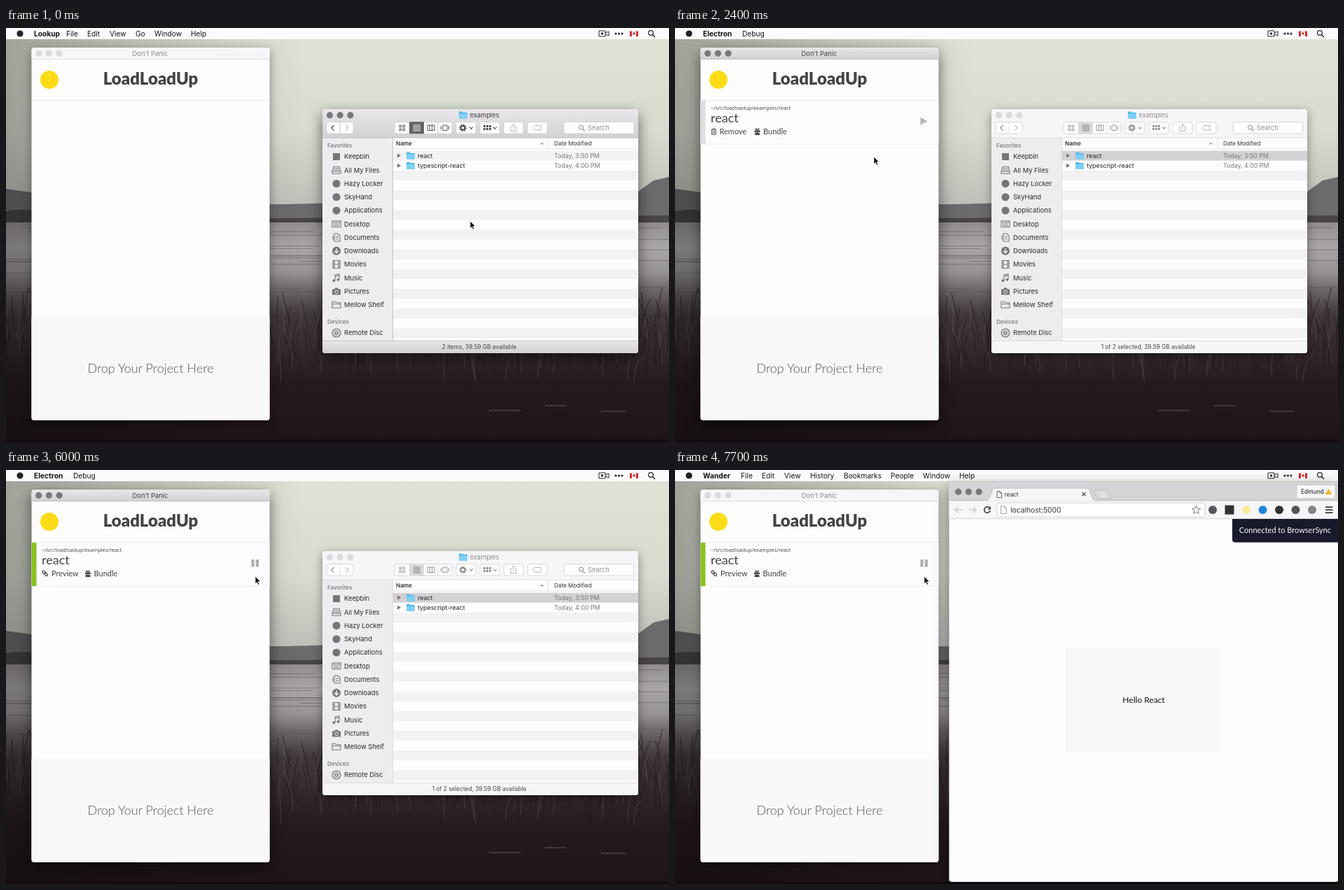
An HTML page for the animation above (8100 ms loop, 947 px wide and 592 px high).

```html
<!DOCTYPE html>
<html lang="en">
<head>
<meta charset="utf-8">
<title>Project bundler demo</title>
<style>
html, body { margin: 0; width: 100%; height: 100%; overflow: hidden; background: #1f151b }
svg { display: block; width: 947px; height: 592px; font-family: Inter, Roboto, sans-serif }
text { white-space: pre }
.lato { font-family: Lato, "Open Sans", sans-serif }
.mid { text-anchor: middle }
.win { --bar: #f6f5f7; --dot: #dcdadd; --ink: #8d8b8e; --line: #d8d6d9; --tabs: #efedf0 }
.win.on { --bar: url(#bar); --dot: #7a787b; --ink: #414042; --line: #b9b7ba; --tabs: #d5d3d6 }
.bar { fill: var(--bar) }
.dot { fill: var(--dot) }
.ink { fill: var(--ink) }
.edge { stroke: var(--line); fill: none }
.btn { fill: #fdfcfe; stroke: #d2d0d3; stroke-width: .8 }
.glyph { fill: none; stroke: var(--ink); stroke-width: 1.1 }
.side { fill: none; stroke: #777579; stroke-width: 1.1 }
.solid { fill: #777579 }
.shadow { filter: drop-shadow(0 4px 7px rgba(0,0,0,.4)) }
.on .shadow { filter: drop-shadow(0 7px 10px rgba(0,0,0,.55)) }
.pick { fill: #f3f2f4 }
.picked .pick { fill: #d3d1d4 }
.picked.on .pick { fill: #636165 }
.picked.on .pickText { fill: #fff }
.picked .tool { stroke: #555 }
.picked:not(.on) .tool { stroke: #b4b2b5 }
.hide { display: none }
</style>
</head>
<body>
<svg id="stage" viewBox="0 0 947 592">
  <defs>
    <linearGradient id="bar" x2="0" y2="1"><stop stop-color="#e9e7ea"/><stop offset="1" stop-color="#d2d0d3"/></linearGradient>
    <linearGradient id="sky" x2="0" y2="1"><stop stop-color="#dfe3d5"/><stop offset=".5" stop-color="#d8dbcf"/><stop offset="1" stop-color="#b8b8b2"/></linearGradient>
    <linearGradient id="lake" x2="0" y2="1"><stop stop-color="#918c90"/><stop offset=".25" stop-color="#aaa6a8"/><stop offset="1" stop-color="#716b70"/></linearGradient>
    <linearGradient id="bank" x2="0" y2="1"><stop stop-color="#4a4247" stop-opacity="0"/><stop offset=".25" stop-color="#41383e"/><stop offset=".65" stop-color="#261a21"/><stop offset="1" stop-color="#1f141a"/></linearGradient>
    <linearGradient id="dim"><stop stop-opacity=".28"/><stop offset=".45" stop-opacity="0"/></linearGradient>
    <g id="folder"><path d="M0 1q0-1 1-1h3.5l1 1.3H11q1 0 1 1V9q0 1-1 1H1Q0 10 0 9Z" fill="#53b9ea"/><path d="M0 3h12v6q0 1-1 1H1Q0 10 0 9Z" fill="#7fd0f5"/></g>
  </defs>

  <g id="desk"></g>
  <g id="menu"></g>
  <g id="app" class="win"></g>
  <g id="files" class="win"></g>
  <g id="web" class="win"></g>

  <g id="pointer">
    <g id="drag" opacity=".8">
      <use href="#folder" x="-29" y="-2"/>
      <rect x="-16" y="-3" width="27" height="12" rx="6" fill="#8a888b"/>
      <text x="-13" y="6.2" font-size="8.9" fill="#fff">react</text>
    </g>
    <path d="M0 0V10.5L2.4 8.4L4.2 12.2L6 11.4L4.2 7.7H7.4Z" fill="#111" stroke="#fff" stroke-width=".7"/>
  </g>
</svg>
<script>
const $ = id => document.getElementById(id);
const text = (x, y, size, str, attrs = '') => `<text x="${x}" y="${y}" font-size="${size}" ${attrs}>${str}</text>`;
const rect = (x, y, w, h, attrs = '') => `<rect x="${x}" y="${y}" width="${w}" height="${h}" ${attrs}/>`;
const path = (d, attrs = '') => `<path d="${d}" ${attrs}/>`;
const circle = (x, y, r, attrs = '') => `<circle cx="${x}" cy="${y}" r="${r}" ${attrs}/>`;
const at = (x, y, body) => `<g transform="translate(${x} ${y})">${body}</g>`;
const lights = (x, y) => [0, 14.7, 29.4].map(d => circle(x + d, y, 4.6, 'class="dot"')).join('');
const topBar = (x, y, w, h) => path(`M${x} ${y + h}v${4 - h}q0-4 4-4h${w - 8}q4 0 4 4v${h - 4}Z`, 'class="bar"');

function seeded(seed) {
  return () => (seed = seed * 16807 % 2147483647) / 2147483647;
}

function drawDesk() {
  const rand = seeded(42);
  let streaks = '', dark = '', light = '';
  for (let i = 0; i < 45; i++)
    streaks += `M${rand() * 947 - 60} ${284 + rand() * 95}h${40 + rand() * 150}`;
  for (let i = 0; i < 420; i++) {
    const blade = `M${rand() * 947} ${420 + rand() * 90}q${rand() * 8 - 4}-25 ${rand() * 30 - 15}-${32 + rand() * 30}`;
    if (i % 4) dark += blade; else light += blade;
  }
  $('desk').innerHTML =
    rect(0, 16, 947, 265, 'fill="url(#sky)"') +
    path('M0 230Q60 238 140 252H400Q520 248 640 252T903 234L925 218L947 213V280H0Z', 'fill="#6d6a6d"') +
    path('M0 262Q30 256 60 266L380 272L947 268V280H0Z', 'fill="#484448"') +
    rect(0, 278, 947, 140, 'fill="url(#lake)"') +
    path(streaks, 'stroke="#5d575c" stroke-opacity=".55" fill="none"') +
    rect(0, 350, 947, 242, 'fill="url(#bank)"') +
    path(dark, 'stroke="#251b21" stroke-opacity=".8" fill="none"') +
    path(light, 'stroke="#74696f" stroke-opacity=".4" fill="none"') +
    path('M690 547h45M770 540h30M850 548h35', 'stroke="#62565d" stroke-opacity=".5" stroke-width="2"') +
    rect(0, 16, 947, 576, 'fill="url(#dim)"') +
    rect(0, 589, 947, 3, 'fill="#120c10"');
}

function drawMenu() {
  const menus = {
    lookup: [[40, 'Lookup'], [86, 'File'], [116, 'Edit'], [148, 'View'], [185, 'Go'], [212, 'Window'], [264, 'Help']],
    electron: [[40, 'Electron'], [96, 'Debug']],
    browser: [[40, 'Wander'], [94, 'File'], [124, 'Edit'], [156, 'View'], [193, 'History'], [241, 'Bookmarks'],
      [308, 'People'], [354, 'Window'], [406, 'Help']]
  };
  let out = rect(0, 0, 947, 16, 'fill="#fbfafc"') + circle(20, 8, 4.6, 'fill="#222"');
  for (const name in menus)
    out += `<g id="menu-${name}">` + menus[name].map(([x, label], i) =>
      text(x, 11.8, 10.2, label, `fill="#151515" font-weight="${i ? 400 : 700}"`)).join('') + '</g>';
  $('menu').innerHTML = out +
    path('M847 4h9v8h-9ZM856 7l5-2v6l-5-2', 'fill="none" stroke="#222"') + circle(851.5, 8, 1.7, 'fill="#222"') +
    [871, 875.5, 880].map(x => circle(x, 8, 1.5, 'fill="#222"')).join('') +
    rect(891, 4.5, 12, 7.5, 'fill="#d92a32"') + rect(894, 4.5, 6, 7.5, 'fill="#fff"') +
    path('M897 5.5l2 2.5-2 2-2-2Z', 'fill="#d92a32"') +
    circle(921, 7, 3.4, 'fill="none" stroke="#222" stroke-width="1.2"') + path('M923.5 9.5l3.5 3.5', 'stroke="#222" stroke-width="1.5"');
}

const gift = (x, y) => at(x, y, path('M-4-1.5H4V1H-4ZM-3.4 2h2.8v3h-2.8ZM.6 2h2.8v3H.6ZM-.6-1.5H.6V5H-.6Z', 'fill="#444"') +
  path('M0-2Q-3-2-2.5-4T0-2Q1-5 2.5-4T0-2', 'fill="none" stroke="#444"'));

function drawApp() {
  const label = (x, str) => text(x, 151.8, 11, str, 'class="lato" fill="#444"');
  $('app').innerHTML =
    rect(36.5, 28, 340, 533, 'rx="4" fill="#fdfcfe" class="shadow"') +
    topBar(36.5, 28, 340, 16.5) + path('M36.5 44.5h340', 'class="edge" stroke-width=".8"') + lights(46.7, 36.3) +
    text(206, 39.8, 9.4, "Don't Panic", 'class="mid ink"') +
    circle(62, 74, 13, 'fill="#fbdc17"') +
    text(206.5, 81.3, 24, 'LoadLoadUp', 'class="mid lato" font-weight="900" fill="#454346"') +
    path('M36.5 103.5h340', 'stroke="#ebe9ec"') +
    path('M36.5 413h340v144q0 4-4 4h-332q-4 0-4-4Z', 'fill="#f8f7f9"') +
    text(206.5, 493.2, 18, 'Drop Your Project Here', 'class="mid lato" font-weight="300" fill="#555"') +
    `<g id="project">` +
      rect(36.5, 104, 340, 62, 'fill="#fcfbfd"') + path('M36.5 166h340', 'stroke="#f0eef1"') +
      rect(36.5, 104, 7, 62, 'id="strip"') +
      text(51, 117, 7.4, '~/src/loadloadup/examples/react', 'style="font-family:Open Sans,sans-serif" fill="#444"') +
      text(51, 135.2, 18, 'react', 'class="lato" fill="#444"') +
      `<g id="idle">` + path('M350.5 127.8v11l10-5.5Z', 'fill="#b9b7ba"') +
        path('M51.5 145.5h7.5M54 145v-1.2h2.8v1.2M52.3 146v6.2h6v-6.2M54.3 147v4M56.3 147v4', 'fill="none" stroke="#444" stroke-width=".9"') +
        label(63.5, 'Remove') + gift(117.5, 148) + label(126, 'Bundle') + '</g>' +
      `<text id="progress" class="lato" x="51" y="151.8" font-size="11" fill="#444"></text>` +
      `<g id="ready">` + rect(350.5, 128, 4.2, 10.5, 'fill="#b0aeb1"') + rect(356.8, 128, 4.2, 10.5, 'fill="#b0aeb1"') +
        at(56, 148, `<g transform="rotate(45)" fill="none" stroke="#444" stroke-width="1.2">` +
          rect(-5, -1.6, 5, 3.2, 'rx="1.6"') + rect(-.8, -1.6, 5, 3.2, 'rx="1.6"') + '</g>') +
        label(65, 'Preview') + gift(117, 148) + label(125.5, 'Bundle') + '</g>' +
    '</g>';
}

function drawFiles() {
  const line = d => path(d, 'class="side"');
  const mark = circle(0, 0, 5.6, 'class="solid"');
  const page = line('M-3-5.5H2L5-2.5V5.5H-3ZM-5-3V3.5M-1-1H3M-1 2H3');
  const folder = line('M-6-4.5h4l1.3 1.5H6v7.5H-6ZM-6-1H6');
  const items = [
    ['Keepbin', rect(-5, -5, 10, 10, 'class="solid"')],
    ['All My Files', line('M-4-5H4L6 2V5H-6V2ZM-6 2H6M-3.5-2.5h7M-4 0h8')],
    ['Hazy Locker', mark], ['SkyHand', mark], ['Applications', mark],
    ['Desktop', line('M-6-4.5H6V4.5H-6ZM-6-2.5H6M-4 2.5H4M-4 0H4')],
    ['Documents', page],
    ['Downloads', circle(0, 0, 6, 'class="solid"') + path('M0-3.5V2.5M-3 0L0 3L3 0', 'fill="none" stroke="#eee" stroke-width="1.6"')],
    ['Movies', line('M-5-5.5H5V5.5H-5ZM-3-5.5v11M3-5.5v11M-3 0H3M-5-2h2M-5 2h2M3-2h2M3 2h2')],
    ['Music', line('M-2 4V-4L4-5.5V2.5M-2-2L4-3.5') + circle(-3.7, 4, 1.9, 'class="solid"') + circle(2.3, 2.6, 1.9, 'class="solid"')],
    ['Pictures', path('M-6-3h3l1.3-2h3.4L3-3h3v8H-6Z', 'class="solid"') + circle(0, .8, 2.3, 'fill="none" stroke="#eee"')],
    ['Mellow Shelf', folder]
  ];
  const entry = (icon, label, y) => at(472, y, icon) + text(483, y + 3.4, 9.4, label, 'fill="#2b2a2c"');
  const head = (y, label) => text(459, y, 8.1, label, 'font-weight="500" fill="#767477"');
  const button = (x, w) => rect(x, 134.5, w, 16.5, 'rx="2.5" class="btn"');
  const row = (y, name, date, cls) => path(`M559 ${y - 3}v6l5.2-3Z`, `fill="#777" class="${cls}"`) +
    `<use href="#folder" x="572" y="${y - 5}"/>` + text(588, y + 3.2, 8.9, name, `fill="#222" class="${cls}"`) +
    text(783, y + 3.2, 8.8, date, `fill="#777" class="${cls}"`);
  let stripes = '';
  for (let i = 2; i < 20; i += 2) stripes += rect(552.5, 175.6 + 14.1 * i, 350, 14.1, 'fill="#f2f1f3"');
  const chevron = x => path(`M${x} 141.5l2.4 2.6 2.4-2.6`, 'class="glyph"');
  const dots = [0, 4, 8].flatMap(x => [0, 4].map(y => rect(682 + x, 139 + y, 2.8, 2.8, 'class="ink"'))).join('');

  $('files').innerHTML =
    rect(452, 116, 451, 349, 'rx="4" fill="#fdfcfe" class="shadow"') +
    topBar(452, 116, 451, 41) + lights(462.5, 124.7) +
    `<use href="#folder" x="647" y="119.5"/>` + text(662.5, 128.3, 9.3, 'examples', 'class="ink"') +
    button(458, 38) + path('M477 134.5v16.5', 'class="edge" stroke-width=".7"') +
    path('M468.5 139l-3.8 3.8 3.8 3.8', 'class="glyph"') + path('M485.5 139l3.8 3.8-3.8 3.8', 'fill="none" stroke="#bbb" stroke-width="1.1"') +
    button(555, 82) + path('M617 134.5v16.5', 'class="edge" stroke-width=".7"') +
    rect(576, 134.2, 21, 17, 'class="dot" id="listMode"') +
    [562, 567].map(x => [139, 144].map(y => rect(x, y, 2.7, 2.7, 'class="glyph" style="stroke-width:.8"')).join('')).join('') +
    path('M581.5 139h10.5M581.5 141.6h10.5M581.5 144.2h10.5M581.5 146.8h10.5', 'id="listLines"') +
    path('M602 139h10v7.5h-10ZM605.3 139v7.5M608.6 139v7.5M624 139h6v7.5h-6ZM621.5 140v5.5M632.5 140v5.5', 'class="glyph" style="stroke-width:.9"') +
    button(643, 28) + circle(652.5, 142.8, 3, 'class="glyph" style="stroke-width:2"') +
    circle(652.5, 142.8, 4.8, 'class="glyph" stroke-dasharray="1.8 1.97"') + chevron(662) +
    button(677, 28) + dots + chevron(696) +
    button(711, 28) + path('M722.5 141h-1.7v6.5h8v-6.5h-1.7M725 145v-8M723 139l2-2 2 2', 'class="tool" fill="none" stroke="#bbb"') +
    button(745, 28) + path('M755.5 139.5h8.5v6.6h-8.5l-3-3.3Z', 'class="tool" fill="none" stroke="#bbb"') +
    rect(797, 134.5, 100, 16.5, 'rx="2.5" class="btn"') +
    circle(821.5, 142, 3, 'fill="none" stroke="#888"') + path('M823.7 144.3l3 3', 'stroke="#888" stroke-width="1.2"') +
    text(831, 146.3, 9.3, 'Search', 'fill="#929094"') +
    rect(452, 157, 100.5, 290, 'fill="#eeecef"') +
    head(171, 'Favorites') + items.map(([label, icon], i) => entry(icon, label, 184 + 19.25 * i)).join('') +
    head(422.7, 'Devices') + entry(circle(0, 0, 6, 'class="side" style="fill:#d1cfd2"') + circle(0, 0, 2, 'class="side"'), 'Remote Disc', 436) +
    stripes + rect(552.5, 175.6, 350.5, 14, 'class="pick"') +
    path('M452 157h451M552.5 157v290', 'class="edge" stroke-width=".8"') +
    path('M552.5 173h350.5M774.5 158v14', 'stroke="#dddbde" stroke-width=".8"') +
    text(557, 168, 8.1, 'Name', 'font-weight="600" fill="#333"') + path('M763 166.5l2.4-2.4 2.4 2.4', 'fill="none" stroke="#555"') +
    text(783, 168, 8.1, 'Date Modified', 'fill="#333"') +
    row(182.6, 'react', 'Today, 3:50 PM', 'pickText') + row(196.8, 'typescript-react', 'Today, 4:00 PM', '') +
    path('M452 447.5h451v13.5q0 4-4 4h-443q-4 0-4-4Z', 'class="bar"') + path('M452 447.5h451', 'class="edge" stroke-width=".8"') +
    `<text id="count" class="mid" x="676" y="458.8" font-size="8.3" fill="#444"></text>`;
}

function drawWeb() {
  const ext = (x, color, id = '') => circle(x, 57, 6, `fill="${color}" ${id}`);
  $('web').innerHTML =
    rect(391.5, 17, 556, 572, 'rx="4" fill="#fdfcfe" class="shadow"') +
    path('M391.5 44V21q0-4 4-4H947V44Z', 'style="fill:var(--tabs)"') +
    rect(391.5, 44, 556, 26, 'fill="#f6f5f7"') + path('M391.5 69.7H947', 'stroke="#d5d3d6"') +
    path('M391.5 43.7H444Q448 43 449.5 39L453 29Q454 26 457 26H588Q591 26 592 29L595.5 39Q597 43 601 43.7H947', 'fill="#f6f5f7" stroke="#bab8bb" stroke-width=".9"') +
    path('M600 29h15q2 0 3 2l3.5 8q.5 2-1.5 2h-14q-2 0-3-2l-4-8q-.5-2 1-2Z', 'fill="#dedce0" stroke="#bab8bb" stroke-width=".9"') +
    lights(404.7, 31.2) + path('M581.5 32l5 5M586.5 32l-5 5', 'stroke="#555" stroke-width="1.2"') +
    rect(888, 21.5, 55, 19, 'rx="2.5" fill="#f8f7f9" stroke="#c6c4c7" stroke-width=".8"') +
    text(894, 34.3, 8.4, 'Edmund', 'font-weight="500" fill="#333"') + path('M933.5 26.5l5 8.5h-10Z', 'fill="#f5b52e"') +
    path('M410 57h-10M404 53l-4 4 4 4M420 57h10M426 53l4 4-4 4', 'fill="none" stroke="#ceccd0" stroke-width="1.7"') +
    rect(460, 47, 297, 20, 'rx="2.5" fill="#fff" stroke="#c9c7ca" stroke-width=".8"') +
    path('M465.5 51.5h5l3 3v8h-8ZM470.5 51.5v3h3', 'fill="none" stroke="#a5a3a6"') +
    text(479, 60.6, 10.3, 'localhost:5000', 'fill="#333"') +
    `<g id="star">` + path('M747.5 51l1.7 4 4.3.4-3.3 2.8 1 4.2-3.7-2.3-3.7 2.3 1-4.2-3.3-2.8 4.3-.4Z', 'fill="none" stroke="#777"') + '</g>' +
    ext(768, '#58565a') + rect(785.5, 50.5, 13, 13, 'fill="#333"') + ext(816, '#f7ec9a') + ext(839.5, '#1f86d6') +
    ext(863, '#333') + ext(886.5, '#555') + ext(910, '#a51c24', 'id="shield"') +
    path('M929 53h10.5M929 57h10.5M929 61h10.5', 'stroke="#555" stroke-width="2"') +
    `<g id="loading">` + path('M442 53l8 8M450 53l-8 8', 'stroke="#666" stroke-width="2"') +
      path('M464 38.5A4.5 4.5 0 0 1 464 31', 'fill="none" stroke="#8d8b90" stroke-width="1.1" id="spin"') +
      text(470.5, 37.7, 8.3, 'Untitled', 'fill="#333"') + '</g>' +
    `<g id="loaded">` + path('M449.5 54.3A4.3 4.3 0 1 0 450.2 58', 'fill="none" stroke="#444" stroke-width="1.7"') + path('M451 52v4.5h-4.5Z', 'fill="#444"') +
      path('M460 30.5h4l2.5 2.5v6.5h-6.5ZM464 30.5v2.5h2.5', 'fill="none" stroke="#666"') +
      text(470.5, 37.7, 8.3, 'react', 'fill="#333"') +
      rect(558.5, 255, 221.5, 148.5, 'fill="#f8f7f9"') + text(669.5, 333, 12, 'Hello React', 'class="mid lato" fill="#111"') + '</g>' +
    `<g id="toast">` + path('M796 70h151v33.5h-147q-4 0-4-4Z', 'fill="#191a2b"') +
      text(871.5, 90.3, 11, 'Connected to BrowserSync', 'class="mid lato" fill="#fff"') + '</g>';
}

const LOOP = 8100;
const route = [[0, 663, 276], [200, 663, 276], [700, 601, 179], [900, 601, 179], [1500, 262, 176], [1700, 262, 177],
  [2100, 284, 184], [2600, 284, 184], [3000, 354, 132], [3300, 354, 132], [3700, 356, 152], [LOOP, 356, 152]];
const builds = [[3200, '0/1'], [3500, '2/9'], [3800, '9/21'], [3900, '17/38'], [4000, '31/57'], [4200, '52/84'], [4300, '68/97'],
  [4500, '89/118'], [4600, '104/131'], [4700, '127/143'], [5000, '146/158'], [5100, '158/162'], [5200, '162/162']];

function pointerAt(t) {
  const i = Math.max(1, route.findIndex(p => p[0] > t));
  const [t0, x0, y0] = route[i - 1], [t1, x1, y1] = route[i];
  const k = (t - t0) / (t1 - t0), e = k * k * (3 - 2 * k);
  return [x0 + (x1 - x0) * e, y0 + (y1 - y0) * e];
}

const show = (id, on) => $(id).classList.toggle('hide', !on);

function render(t) {
  const focus = t < 2300 ? 'lookup' : t < 6200 ? 'electron' : 'browser';
  const picked = t >= 700, building = t >= 3200 && t < 5800, ready = t >= 5800, loaded = t >= 6700;
  for (const name of ['lookup', 'electron', 'browser']) show('menu-' + name, name === focus);
  $('app').classList.toggle('on', focus === 'electron');
  $('files').classList.toggle('on', focus === 'lookup');
  $('files').classList.toggle('picked', picked);
  $('web').classList.toggle('on', t >= 6500);
  $('listMode').style.fill = focus === 'lookup' ? '#656367' : '#dbd9dc';
  $('listLines').style.stroke = focus === 'lookup' ? '#fff' : '#777';
  $('count').textContent = (picked ? '1 of 2 selected' : '2 items') + ', 39.59 GB available';

  show('project', t >= 1900);
  show('idle', t < 3200);
  show('progress', building);
  show('ready', ready);
  $('strip').style.fill = ready ? '#8ac11f' : '#dfdde0';
  if (building) $('progress').textContent = builds.filter(b => b[0] <= t).pop()[1] + ' build modules';

  show('files', t < 6200);
  show('web', t >= 6200);
  show('loading', !loaded);
  show('loaded', loaded);
  show('toast', t >= 7100);
  $('spin').setAttribute('transform', `rotate(${(t - 6300) * .36} 465.5 34.7)`);
  $('star').setAttribute('transform', `translate(${loaded ? -3 : 0} 0)`);
  $('shield').setAttribute('fill', loaded ? '#858387' : '#a51c24');

  show('drag', t >= 900 && t < 1900);
  $('pointer').setAttribute('transform', `translate(${pointerAt(t).join(' ')})`);
}

function tick(now) {
  render(Math.floor(now % LOOP / 100) * 100);
  requestAnimationFrame(tick);
}

drawDesk();
drawMenu();
drawApp();
drawFiles();
drawWeb();
tick(performance.now());
</script>
</body>
</html>
```
